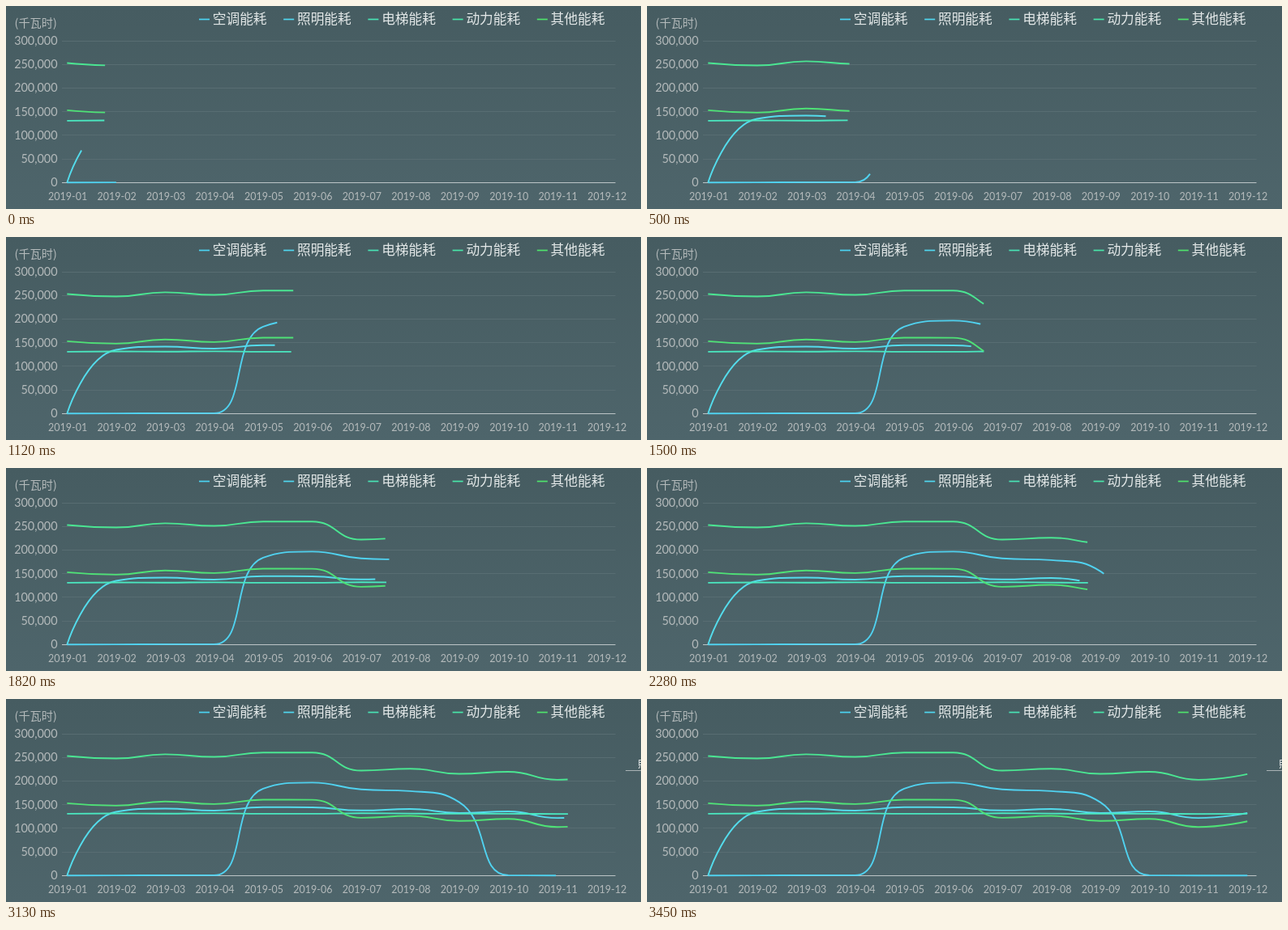
Animation of 783 by 251 pixels, one loop 3760 ms. Source, as an HTML page:

```html
<!DOCTYPE html>
<html lang="zh">
<head>
<meta charset="utf-8">
<title>能耗</title>
<style>
  html, body { margin: 0; width: 100%; height: 100%; overflow: hidden; background: #4a6067; }
  svg { display: block; width: 783px; height: 251px; }
  text { font-family: Lato, "Noto Sans CJK SC", "Noto Sans CJK", sans-serif; fill: #b4babb; }
  .cjk { font-family: "Noto Sans CJK SC", "Noto Sans CJK", sans-serif; }
  .line { fill: none; stroke-width: 1.9; stroke-linejoin: bevel; }
</style>
</head>
<body>
<svg id="stage" viewBox="0 0 783 251">
  <defs>
    <linearGradient id="bg" x2="0" y2="1">
      <stop stop-color="#465c61"/>
      <stop offset="1" stop-color="#4e656b"/>
    </linearGradient>
  </defs>
  <rect width="783" height="251" fill="url(#bg)"/>
</svg>
<script>
(() => {
  const LOOP = 3760, DRAW = 4000, HOLD = 500, STEP = 77.63;
  const X0 = 75.3, DX = 60.45, Y0 = 218.3, UNIT = 0.5833;
  const stage = document.getElementById('stage');

  function add(tag, attrs, text, parent = stage) {
    const el = document.createElementNS('http://www.w3.org/2000/svg', tag);
    for (const key in attrs) el.setAttribute(key, attrs[key]);
    if (text) el.textContent = text;
    return parent.appendChild(el);
  }

  const clamp = (v, a, b) => Math.max(Math.min(a, b), Math.min(Math.max(a, b), v));
  const mix = (p, q, t) => [p[0] + (q[0] - p[0]) * t, p[1] + (q[1] - p[1]) * t];
  const dist = (p, q) => Math.hypot(q[0] - p[0], q[1] - p[1]);

  // Left part of a cubic cut at t, by de Casteljau
  function cut([a, b, c, d], t) {
    const ab = mix(a, b, t), bc = mix(b, c, t), cd = mix(c, d, t);
    const abc = mix(ab, bc, t), bcd = mix(bc, cd, t);
    return [a, ab, abc, mix(abc, bcd, t)];
  }

  function cubicLength(curve) {
    let sum = 0, last = curve[0];
    for (let i = 1; i <= 10; i++) {
      const p = cut(curve, i / 10)[3];
      sum += dist(last, p);
      last = p;
    }
    return sum;
  }

  // Smooth curve whose handles stay inside the box of each segment
  function smooth(pts) {
    const curves = [];
    let out = pts[0];
    for (let i = 1; i < pts.length; i++) {
      const prev = pts[i - 1], p = pts[i], next = pts[i + 1];
      let into = p, after = p;
      if (next) {
        const lp = dist(prev, p), ln = dist(p, next);
        const k = 0.5 * ln / (lp + ln);
        after = p.map((v, j) => clamp(v + (next[j] - prev[j]) * k, v, next[j]));
        into = p.map((v, j) => clamp(v - (after[j] - v) * lp / ln, v, prev[j]));
        after = p.map((v, j) => v + (v - into[j]) * ln / lp);
      }
      curves.push([prev, out, into, p]);
      out = after;
    }
    return curves;
  }

  function partPath(s, part) {
    let left = s.total * part, d = 'M' + s.curves[0][0];
    for (let i = 0; i < s.curves.length && left > 0; i++) {
      const c = cut(s.curves[i], Math.min(1, left / s.lengths[i]));
      d += 'C' + c.slice(1).join(' ');
      left -= s.lengths[i];
    }
    return d;
  }

  // Axes
  for (let i = 0; i <= 6; i++) {
    const y = Y0 - i * 50 * UNIT, row = Math.round(y - 0.5) + 0.5;
    add('path', { d: `M69 ${row}H751.5`, stroke: i ? '#586d72' : '#bcc5c7' });
    add('text', { x: 63.5, y: y + 4.8, 'font-size': 14.4, 'text-anchor': 'end' },
      (i * 50000).toLocaleString('en-US'));
  }
  for (let i = 0; i < 12; i++) {
    add('text', { x: X0 + 0.9 + i * DX, y: 239.8, 'font-size': 12.5, 'text-anchor': 'middle' },
      '2019-' + String(i + 1).padStart(2, '0'));
  }
  add('text', { class: 'cjk', x: 36.7, y: 26, 'font-size': 14.2, 'text-anchor': 'middle' }, '(千瓦时)');

  // Legend
  const legend = [
    ['空调能耗', '#4bd3f2'], ['照明能耗', '#50d8f0'], ['电梯能耗', '#48e3b4'],
    ['动力能耗', '#48e6a8'], ['其他能耗', '#4fe36c']
  ];
  legend.forEach(([name, color], i) => {
    const x = 238 + i * 104.2;
    add('path', { d: `M${x} 16.5h13`, stroke: color, 'stroke-width': 1.7 });
    add('text', { class: 'cjk', x: x + 16.8, y: 22.4, 'font-size': 16.7, style: 'fill:#e3e8e8' }, name);
  });

  // Series, in thousands
  const power = [253.4, 248.2, 257, 251.6, 260.8, 260.6, 222.5, 226.5, 215.7, 220, 203, 215];
  const series = [
    ['#50d2f0', [0, 0.3, 0.7, 0.7, 184, 197, 182.6, 179, 155.5, 0.6, 0.2, 0.2]],
    ['#54dcec', [0, 135, 142, 137.7, 145, 144.5, 138, 141, 132.7, 136, 122, 132.5]],
    ['#4ae8c0', [131, 131.6, 131.2, 131.9, 131.1, 131, 132, 131.4, 131, 131.1, 130.6, 131]],
    ['#4ae692', power],
    ['#4ee276', power.map(v => v - 100)]
  ].map(([color, values]) => {
    const curves = smooth(values.map((v, i) => [X0 + i * DX, Y0 - v * UNIT]));
    const lengths = curves.map(cubicLength);
    const total = lengths.reduce((a, b) => a + b);
    return { curves, lengths, total, el: add('path', { class: 'line', stroke: color }) };
  });

  // Label reaching in from the right edge
  const label = add('g', {});
  add('path', { d: 'M764 88.5H783', stroke: '#a9b3b5' }, '', label);
  add('text', { class: 'cjk', x: 779.2, y: 84.8, 'font-size': 12, style: 'fill:#fff' }, '照明能耗', label);

  function render(t) {
    const step = Math.min(38, Math.floor((t - HOLD + 10) / STEP));
    const now = t < HOLD ? 0 : HOLD + step * STEP;
    const part = t < HOLD ? 0.0763 : Math.min(1, (now + 550) / DRAW);
    for (const s of series) s.el.setAttribute('d', partPath(s, part));
    label.setAttribute('opacity', clamp((now - 2450) / 300, 0, 1));
  }

  const start = performance.now();
  function tick() {
    render((performance.now() - start) % LOOP);
    requestAnimationFrame(tick);
  }
  tick();
})();
</script>
</body>
</html>
```
